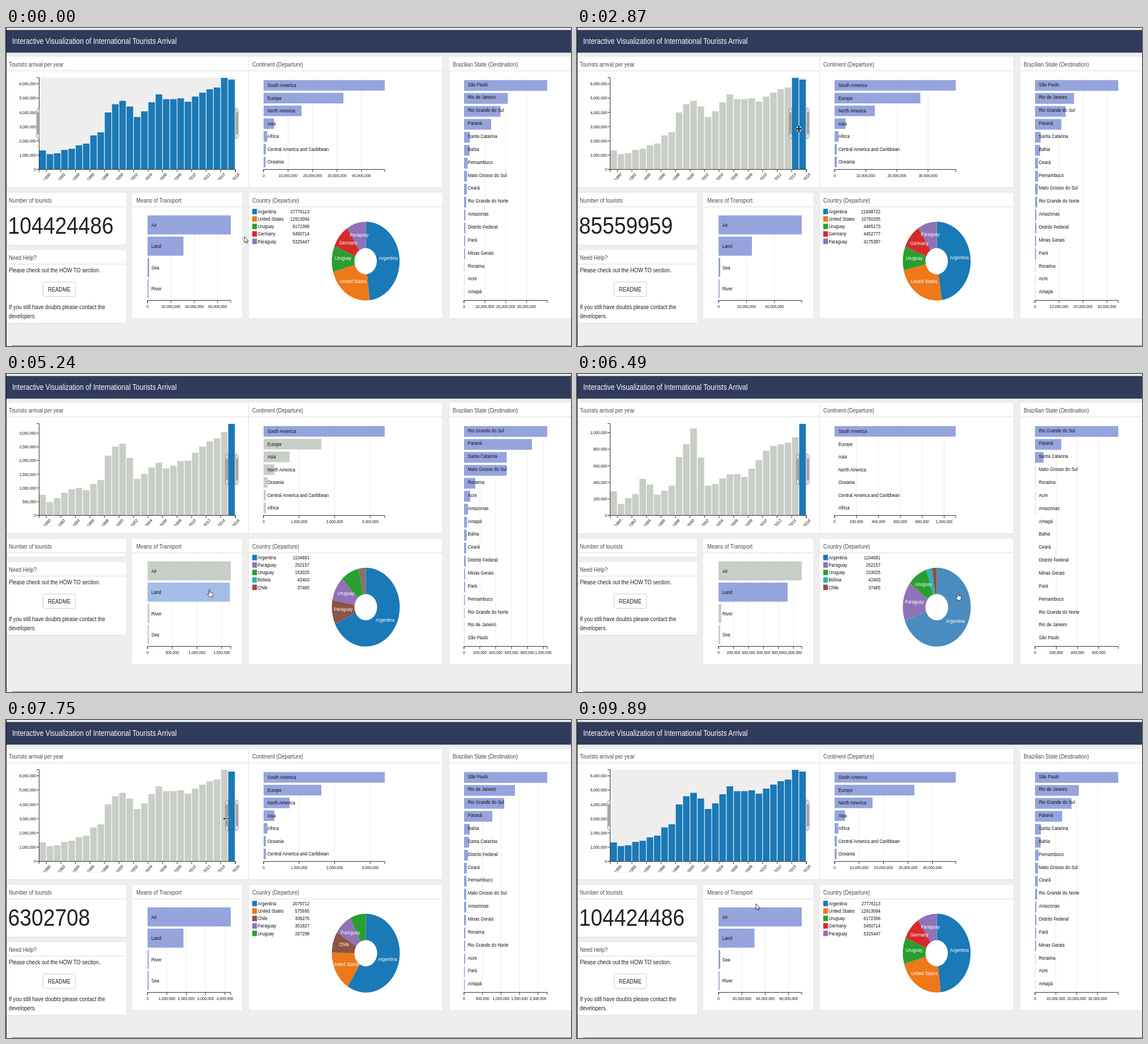
Animation of 998 by 561 pixels, one loop 9.92 s. Source, as an HTML page:

```html
<!DOCTYPE html>
<html lang="en">
<head>
<meta charset="utf-8">
<title>Interactive Visualization of International Tourists Arrival</title>
<style>
  html, body { margin: 0; width: 100%; height: 100%; overflow: hidden; background: #eee; }
  svg { display: block; width: 100%; height: 100%; }
  text { font-family: "Liberation Sans", Arial, sans-serif; white-space: pre; }
</style>
</head>
<body>
<svg viewBox="0 0 998 561" preserveAspectRatio="none">
  <defs><clipPath id="cut"><rect x="58" y="250" width="365" height="18.2"/></clipPath></defs>
  <g id="page"></g>
  <g id="live"></g>
</svg>
<script>
const LOOP = 9920;
const SX = 0.665, SY = 0.77;            // the screen is shown slightly squeezed
const BLUE = '#1a79b7', BAR = '#95a4dd', HOVER = '#a4bde8', DIM = '#c8cec6', INK = '#222';
const X0 = 58.5, PITCH = 12.83, BASE = 249.3, TOP = 87.5;

const colors = {
  Argentina: BLUE, 'United States': '#ef7819', Uruguay: '#2a9e31', Germany: '#d52a2b',
  Paraguay: '#9072b8', Chile: '#8b5447', Bolivia: '#2fb2b9', Peru: '#87716f'
};
const places = {
  SP: 'São Paulo', RJ: 'Rio de Janeiro', RS: 'Rio Grande do Sul', PR: 'Paraná', SC: 'Santa Catarina',
  BA: 'Bahia', PE: 'Pernambuco', MS: 'Mato Grosso do Sul', CE: 'Ceará', RN: 'Rio Grande do Norte',
  AM: 'Amazonas', DF: 'Distrito Federal', PA: 'Pará', MG: 'Minas Gerais', RR: 'Roraima', AC: 'Acre', AP: 'Amapá',
  sa: 'South America', eu: 'Europe', na: 'North America', as: 'Asia', af: 'Africa',
  ca: 'Central America and Caribbean', oc: 'Oceania', a: 'Air', l: 'Land', s: 'Sea', r: 'River'
};

// chart data: scale maximum, tick step, row order, bar sizes
const data = (max, step, order, size) => ({ max, step, names: order.split(' ').map(k => places[k]), size });
const yearData = (max, step, tops) => ({ max, step, size: tops.map(y => BASE - y) });
const pieData = (names, values) => names.split(',').map((name, i) => ({ name, value: values[i] }));

const yearsAll = yearData(6.44e6, 1e6, [216, 222.5, 221, 215, 213, 207, 204, 189.5, 184, 149, 134.5, 128.5, 138.5,
  157, 147, 131, 117, 125.5, 125.5, 124, 130, 121, 114, 108, 105, 88, 91]);
const yearsSouth = yearData(3.35e6, 5e5, [213, 226, 219, 209.5, 203, 201, 205, 194, 187, 144, 128, 123, 148,
  185, 176, 165, 156.5, 166.5, 162, 153.5, 153, 139, 128, 119, 113.5, 102.5, 88]);
const yearsArg = yearData(1.11e6, 2e5, [207, 229, 219, 212, 185, 195, 213, 206, 197, 146.5, 124, 96, 147.5,
  197, 194, 184, 177, 176.5, 181.5, 167, 152, 135.5, 127, 124, 121, 111.5, 88]);

const TOP5 = 'Argentina,United States,Uruguay,Germany,Paraguay';
const LAND5 = 'Argentina,Paraguay,Uruguay,Bolivia,Chile';
const landOrder = 'RS PR SC MS RR AC AM AP BA CE DF MG PA PE RN RJ SP';

const all = {
  years: yearsAll, num: '104424486',
  cont: data(49.5e6, 1e7, 'sa eu na as af ca oc', [214, 141, 67, 18.5, 6.5, 4, 3.5]),
  means: data(71.2e6, 2e7, 'a l s r', [147, 63.5, 3, 1.7]),
  state: data(39.9e6, 1e7, 'SP RJ RS PR SC BA PE MS CE RN AM DF PA MG RR AC AP',
    [147, 77.5, 64.5, 48, 10.5, 10, 6.5, 5.5, 5, 4, 2.5, 2.5, 2, 2, .6, .5, .4]),
  pie: pieData(TOP5, [27776113, 12913094, 6172396, 5450714, 5325447])
};
const first = { ...all, num: '', pie: pieData(TOP5, [27352181, 12773251, 6026268, 5382056, 5241678]) };
const part = {
  years: yearsAll, num: '85559959',
  cont: data(38.9e6, 1e7, 'sa eu na as af ca oc', [214, 151.5, 71, 19.5, 7, 4, 4]),
  means: data(59.6e6, 2e7, 'a l s r', [147, 59, 3, 1.7]),
  state: data(34.7e6, 1e7, 'SP RJ RS PR SC BA CE PE MS RN AM DF MG PA RR AC AP',
    [147, 69, 54, 46.5, 10, 9, 5.5, 5.5, 5, 4, 2.5, 2.5, 2, 2, .6, .5, .4]),
  pie: pieData(TOP5, [21698722, 10750335, 4465173, 4452777, 4175387])
};
const last = {
  years: yearsAll, num: '6302708',
  cont: data(3.41e6, 1e6, 'sa eu na as af oc ca', [214, 102, 46, 19, 7, 4, 4]),
  means: data(4.3e6, 1e6, 'a l r s', [147, 63.5, 2, 2]),
  state: data(2.25e6, 5e5, 'SP RJ RS PR BA SC DF CE PE MS AM MG RR RN AC PA AP',
    [147, 90, 71, 50, 10, 9, 7, 5, 4.5, 4, 4, 3.5, 2.5, 2, 2, 1.5, 1.5]),
  pie: pieData('Argentina,United States,Chile,Paraguay,Uruguay', [2079712, 575695, 306276, 301827, 267298])
};
const south = {
  years: yearsSouth, num: '', cont: last.cont, pickCont: true,
  means: data(1.683e6, 5e5, 'a l r s', [147, 145.5, 3.5, 2.5]),
  state: data(1.05e6, 2e5, 'RS PR SP RJ SC BA MS RR AM AC DF CE PE MG RN AP PA',
    [147, 120, 75.5, 75.5, 20, 11, 7, 5.5, 5, 4, 3, 2, 2, 1.5, 1, .5, .5]),
  pie: pieData('Argentina,Chile,Paraguay,Uruguay,Peru', [2079712, 306276, 301827, 267298, 107000])
};
const land = {
  ...south, pickMeans: true, years: { ...yearsArg, max: 1.65e6, step: 5e5 },
  cont: data(1.65e6, 5e5, 'sa eu as na oc ca af', [214, 28, 12, 6, 3, 2, 2]),
  state: data(.9e6, 2e5, landOrder, [147, 90, 40, 16, 9, 5, 3, 2, 1, 1, .5, 0, 0, 0, 0, 0, 0]),
  pie: pieData(LAND5, [1104681, 252157, 153025, 42403, 37465])
};
const arg = {
  ...land, years: yearsArg,
  cont: data(1.106e6, 2e5, 'sa eu as na oc ca af', [214, 0, 0, 0, 0, 0, 0]),
  means: data(1.11e6, 2e5, 'a l r s', [147, 122, 5, 3]),
  state: data(.784e6, 2e5, landOrder, [147, 46.5, 15, .6, .5, .5, .5, 0, 0, 0, 0, 0, 0, 0, 0, 0, 0])
};

// time, view, length of the transition into it
const events = [
  [0, all, 1], [1470, first, 300], [2450, part, 380], [3010, last, 370], [4080, south, 450],
  [5220, land, 340], [5740, { ...arg, pickPie: true }, 320], [6490, arg, 1], [6590, land, 250],
  [6850, south, 280], [7130, last, 350], [7950, { ...last, num: '' }, 1], [8450, part, 400],
  [8950, first, 400], [9560, all, 320]
];

// pointer: time, x, y, shape until the next point
const pointer = [
  [0, 421, 368, 'arrow'], [130, 421, 368, 'arrow'], [280, 421, 348, 'arrow'], [510, 421, 348, 'arrow'],
  [900, 60, 176, 'ew'], [930, 58, 174, 'ew'], [1160, 58, 174, 'move'], [1490, 72, 177, 'move'],
  [2150, 210, 177, 'move'], [2870, 392, 178, 'move'], [3170, 400, 177, 'move'], [3580, 400, 177, 'arrow'],
  [4000, 560, 100, 'hand'], [4600, 560, 100, 'arrow'], [5100, 359.5, 380, 'hand'], [5570, 359.5, 380, 'hand'],
  [5600, 359.5, 380, 'arrow'], [5720, 672.5, 386, 'hand'], [6590, 672.5, 386, 'arrow'], [6800, 360, 383, 'hand'],
  [6880, 360, 383, 'arrow'], [7090, 560, 100, 'hand'], [7170, 560, 100, 'arrow'], [7480, 400, 172, 'move'],
  [7510, 400, 172, 'move'], [7690, 389.5, 174, 'ew'], [7800, 389.5, 174, 'ew'], [8500, 225, 176, 'ew'],
  [9300, 57, 175, 'ew'], [9560, 57, 175, 'arrow'], [9890, 316, 324, 'arrow']
];

const EW = 'M-6 0L-3-3.2V-.9H3V-3.2L6 0 3 3.2V.9H-3V3.2Z';
const dark = 'fill="#111" stroke="#fff" stroke-width=".7"';
const light = 'fill="#fff" stroke="#222" stroke-width=".9" stroke-linejoin="round"';
const shapes = {
  arrow: `<path d="M0 0V10.5L2.4 8.4 4 12 5.6 11.3 4.1 7.8H7.3Z" ${light}/>`,
  hand: `<path d="M-1 .8Q0-.7 1 .8V5L5.2 6Q6.4 6.5 6.2 8L5.4 13H-.2L-3.6 8.6Q-3.4 7-2.2 7.5L-1 8.6Z" ${light}/>`,
  ew: `<path d="${EW}" ${dark}/>`,
  move: `<path d="${EW}" ${dark}/><path d="${EW}" transform="rotate(90) scale(1.1 1)" ${dark}/>
    <path d="M-4 0H4M0-4V4" stroke="#111" stroke-width="1.4"/>`
};

const lerp = (a, b, p) => a + (b - a) * p;
const ease = p => p < .5 ? 4 * p ** 3 : 1 - (2 - 2 * p) ** 3 / 2;
const rect = (x, y, w, h, fill) => `<rect x="${x}" y="${y}" width="${Math.max(0, w)}" height="${Math.max(0, h)}" fill="${fill}"/>`;
const line = (d, color = '#333', w = 1) => `<path d="${d}" fill="none" stroke="${color}" stroke-width="${w}"/>`;
const text = (x, y, s, size, fill = '#111', anchor = 'start') =>
  `<text transform="translate(${x} ${y}) scale(${SX} ${SY})" font-size="${size}" fill="${fill}" text-anchor="${anchor}">${s}</text>`;
const panel = (x, y, w, h, title, tx, ty = y + 16.7) =>
  rect(x, y, w, h, '#fff') + line(`M${x} ${y + h + .5}h${w}`, '#e3e3e3') + line(`M${x} ${y + 24.5}h${w}`, '#ddd') +
  text(tx, ty, title, 14, '#4a4a4a');

function drawPage() {
  page.innerHTML = rect(0, 0, 998, 561, '#eee') + rect(0, 3.5, 998, 40, '#303a5a') +
    text(11, 28, 'Interactive Visualization of International Tourists Arrival', 18.1, '#fff') +
    panel(1, 51, 427, 230, 'Tourists arrival per year', 5) +
    panel(428, 51, 343, 230, 'Continent (Departure)', 435) + line('M428.5 51V281M771.5 51V281', '#e3e3e3') +
    panel(782, 51, 216, 461, 'Brazilian State (Destination)', 789) +
    panel(223, 291, 194, 221, 'Means of Transport', 230) +
    panel(428, 291, 343, 221, 'Country (Departure)', 435) +
    line('M782.5 51V512M771.5 291V512M428.5 291V512', '#e6e6e6') +
    line('M.5 0V561', '#222') + line('M11 560.3H998', '#777');
}

function blend(from, to, p) {
  return {
    names: to.names,
    max: lerp(from.max, to.max, p),
    step: p < .2 ? from.step : to.step,
    size: to.size.map((v, i) => lerp(from.size[i], v, p))
  };
}

const ticks = d => Array.from({ length: Math.floor(d.max / d.step) + 1 }, (_, i) => i * d.step);
const comma = n => n.toLocaleString('en-US');

function drawYears(d, k) {
  const edge = X0 + PITCH * k, end = 405.5;
  let s = rect(edge, TOP, end - edge, BASE - TOP, '#eee');
  d.size.forEach((h, i) => s += rect(59 + PITCH * i, BASE - h, 11.6, h, i < k ? DIM : BLUE));
  let axis = `M54 ${TOP}H58.5V249.5H54M58.5 254V249.5H405.5V254`;
  for (const v of ticks(d)) {
    const y = BASE - v / d.max * (BASE - TOP);
    axis += `M54 ${y}H58.5`;
    s += text(53, y + 2.8, comma(v), 10, '#111', 'end');
  }
  let labels = '';
  for (let i = 0; i < 14; i++) {
    const x = X0 + PITCH * (1 + 2 * i);
    axis += `M${x} 249.5V254`;
    labels += `<text transform="translate(${x + 8} 258.6) scale(${SX} ${SY}) rotate(-45)" font-size="10" fill="#111" text-anchor="end">${1990 + 2 * i}</text>`;
  }
  s += line(axis) + `<g clip-path="url(#cut)">${labels}</g>`;
  const grip = (x, dir) => `<g transform="translate(${x} 141) scale(${dir} 1)" fill="#eee" fill-opacity=".85" stroke="#666" stroke-width=".75">
    <path d="M0 0A4.2 4.8 0 0 1 4.2 4.8V49.6A4.2 4.8 0 0 1 0 54.4ZM1.4 8V46.4M2.8 8V46.4"/></g>`;
  return s + grip(edge, -1) + grip(end + .4, 1);
}

function drawRows(d, box, pick, mouse) {
  const { x, y, w, bottom, shift } = box, n = d.size.length, gap = 3.85;
  const h = (bottom - y - gap * (n + 1)) / n;
  let axis = `M${x} ${bottom + 4.5}V${bottom}H${x + w}V${bottom + 4.5}`, grid = '', s = '';
  for (const v of ticks(d)) {
    const tx = x + v / d.max * w;
    axis += `M${tx} ${bottom}v4.5`;
    if (v) grid += `M${tx} ${y}V${bottom}`;
    s += text(tx, bottom + 13, comma(v), 10, '#111', 'middle');
  }
  s = line(grid, '#ebebeb') + s;
  d.size.forEach((size, i) => {
    const top = y + gap + i * (h + gap);
    const over = mouse.x > x && mouse.x < x + size && mouse.y > top && mouse.y < top + h;
    s += rect(x, top, size, h, pick >= 0 && pick !== i ? DIM : over ? HOVER : BAR) +
      text(x + 6.7, top + h / 2 + shift, d.names[i], 11.7);
  });
  return s + line(axis);
}

const shares = pie => {
  const sum = pie.reduce((a, c) => a + c.value, 0);
  return pie.map(c => c.value / sum);
};

function drawPie(from, to, p, picked, mouse) {
  const cx = 635.5, cy = 411.3, a = shares(from), b = shares(to);
  const at = (f, r) => {
    const q = f * 2 * Math.PI;
    return [cx + Math.sin(q) * r * .667, cy - Math.cos(q) * r * .772];
  };
  const over = mouse.x > cx && Math.hypot((mouse.x - cx) / 60, (mouse.y - cy) / 69.5) < 1;
  let pos = 0, s = '', labels = '';
  to.forEach((c, i) => {
    const f = lerp(a[i], b[i], p), big = f > .5 ? 1 : 0;
    let fill = colors[(p < .5 ? from : to)[i].name];
    if (picked && i) fill = DIM;
    if (over && !i) fill = '#4a8cc0';
    s += `<path d="M${at(pos, 90)}A60 69.5 0 ${big} 1 ${at(pos + f, 90)}L${at(pos + f, 30)}A20 23.2 0 ${big} 0 ${at(pos, 30)}Z" fill="${fill}"/>`;
    const [lx, ly] = at(pos + f / 2, 60);
    if (b[i] > .0796) labels += text(lx, ly + .6, c.name, 11.7, '#fff', 'middle');
    const y = 327 + 13.15 * i;
    labels += rect(435, y - 8, 8.3, 9.6, colors[c.name]) + text(444.5, y, c.name, 11.5) +
      text(536, y, c.value, 11.5, '#111', 'end');
    pos += f;
  });
  return s + labels;
}

function drawSide(num) {
  const dy = num ? 0 : -60;
  return panel(1, 291, 211, 91.5 + dy, 'Number of tourists', 5) +
    (num ? text(3.6, 363, num, 56, INK) : '') +
    panel(1, 392 + dy, 211, 128, 'Need Help?', 5) +
    text(5, 431.3 + dy, 'Please check out the HOW TO section.', 14, INK) +
    `<rect x="65.5" y="${448 + dy}" width="57" height="25.5" rx="3" fill="#fff" stroke="#ccc"/>` +
    text(94, 464.5 + dy, 'README', 14, INK, 'middle') +
    text(5, 496.2 + dy, 'If you still have doubts please contact the', 14, INK) +
    text(5, 511.5 + dy, 'developers.', 14, INK);
}

function mouseAt(t) {
  let i = pointer.length - 1;
  while (pointer[i][0] > t) i--;
  const [t0, x, y, shape] = pointer[i], next = pointer[i + 1];
  if (!next) return { x, y, shape };
  const p = (t - t0) / (next[0] - t0);
  return { x: lerp(x, next[1], p), y: lerp(y, next[2], p), shape };
}

function brushAt(t, x) {
  const k = (x - X0) / PITCH, clamp = v => Math.max(0, Math.min(26, v));
  if (t < 1160 || t >= 9300) return 0;
  if (t < 3170) return clamp(Math.floor(k));
  return t < 7800 ? 26 : clamp(Math.ceil(k));
}

const boxes = {
  cont: { x: 455, y: 88, w: 214, bottom: 249.5, shift: 3 },
  means: { x: 250, y: 326.7, w: 147, bottom: 480.5, shift: 3.2 },
  state: { x: 809, y: 88, w: 147, bottom: 480.5, shift: 1.2 }
};

function draw(t) {
  let i = events.length - 1;
  while (events[i][0] > t) i--;
  const [start, to, length] = events[i], from = i ? events[i - 1][1] : to;
  const p = ease(Math.min(1, (t - start) / length)), mouse = mouseAt(t);
  const rows = (key, pick) => drawRows(blend(from[key], to[key], p), boxes[key], pick, mouse);
  live.innerHTML = drawSide(to.num) +
    drawYears(blend(from.years, to.years, p), brushAt(t, mouse.x)) +
    rows('cont', to.pickCont ? 0 : -1) + rows('means', to.pickMeans ? 1 : -1) + rows('state', -1) +
    drawPie(from.pie, to.pie, p, to.pickPie, mouse) +
    `<g transform="translate(${mouse.x} ${mouse.y})">${shapes[mouse.shape]}</g>`;
}

const page = document.getElementById('page'), live = document.getElementById('live');
drawPage();
const begin = performance.now();
function loop() {
  draw((performance.now() - begin) % LOOP);
  requestAnimationFrame(loop);
}
loop();
</script>
</body>
</html>
```
